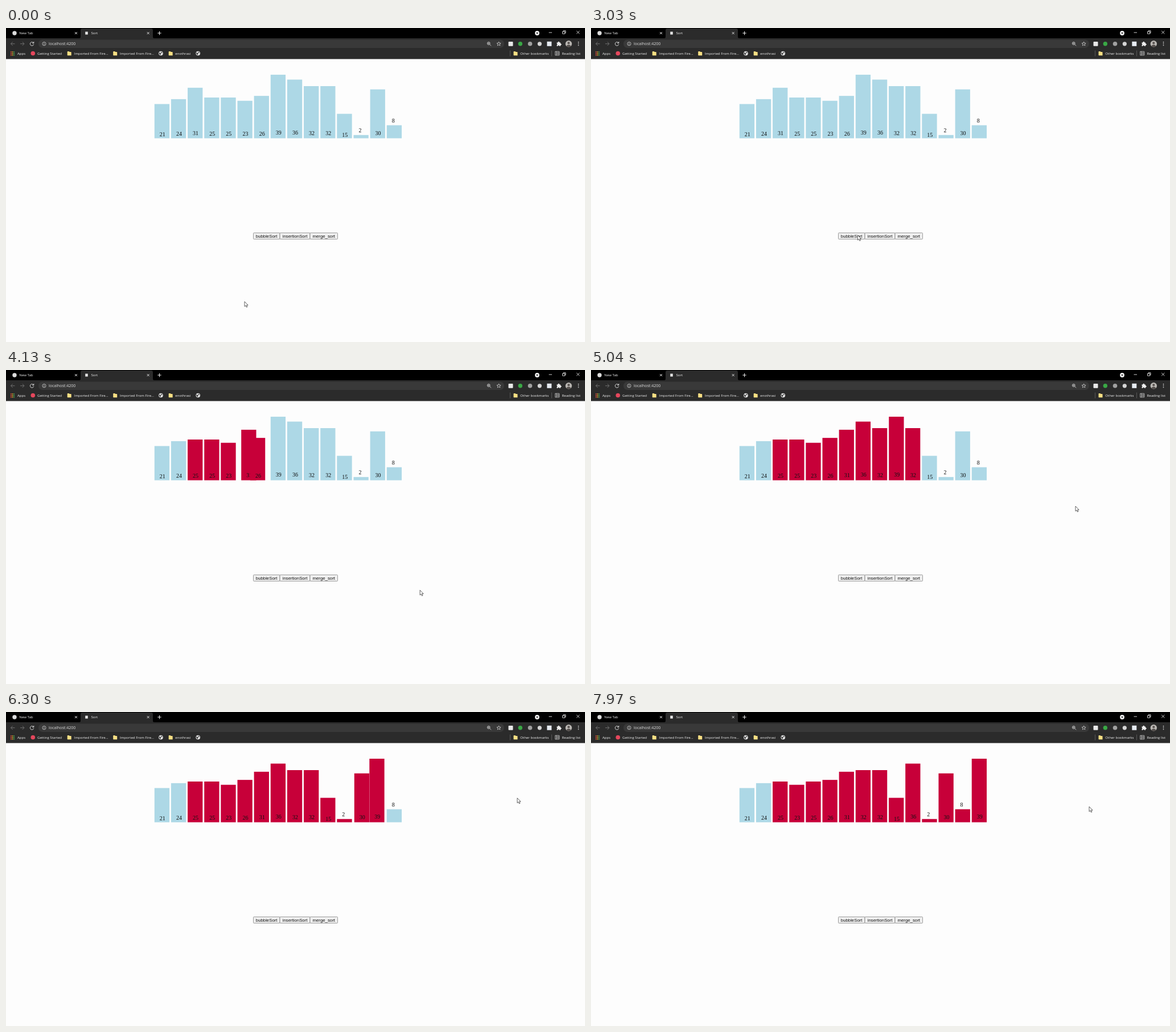
Recreate the animation shown at these times as an HTML page. Size 1017 by 551 pixels, loop 8000 ms.

```html
<!DOCTYPE html>
<html lang="en">
<head>
<meta charset="utf-8">
<title>Sort</title>
<style>
  html, body { margin: 0; width: 100%; height: 100%; overflow: hidden; background: #fdfdfd; }
  svg { display: block; width: 100%; height: 100%; }
  .ui { font: 6.1px "Open Sans", "Noto Sans", sans-serif; fill: #f2f2f2; }
  .btn { font: 7.8px "Liberation Sans", Arial, sans-serif; fill: #111; }
  .num { font: 10px "Liberation Serif", "Times New Roman", serif; fill: #111; }
  .line { fill: none; stroke: #e8e8e8; stroke-width: .9; }
  .dim { stroke: #777; }
</style>
</head>
<body>
<svg id="stage" viewBox="0 0 1017 551" xmlns="http://www.w3.org/2000/svg">
  <rect width="1017" height="551" fill="#fdfdfd"/>

  <!-- tab strip -->
  <rect width="1017" height="18" fill="#000"/>
  <path d="M129 18Q131 18 131 15V4Q131 1 134 1H255Q258 1 258 4V15Q258 18 260 18Z" fill="#2b2b2b"/>
  <circle cx="15" cy="9" r="3.7" fill="#ddd"/>
  <rect x="139.2" y="6.5" width="4.6" height="5" fill="#e4e4e4"/>
  <g class="ui"><text x="23.3" y="11.2">New Tab</text><text x="149.5" y="11.2">Sort</text></g>
  <g class="line">
    <path id="tabClose" d="M121 7l4 4m0-4l-4 4"/>
    <use href="#tabClose" x="126.7"/>
    <path d="M266.3 9h6.4M269.5 5.8v6.4" stroke-width="1.1"/>
    <path d="M953.5 8h5.5M1002.2 5l5.2 5.2m0-5.2l-5.2 5.2M977.6 6.2h4v4h-4zM979 6V4.800h4v4h-1.200"/>
  </g>
  <circle cx="933" cy="9" r="3.9" fill="#f4f4f4"/>
  <path d="M931 8h4l-2 2.500z" fill="#111"/>

  <!-- toolbar -->
  <rect y="18" width="1017" height="36.500" fill="#2b2b2b"/>
  <rect x="57" y="20.500" width="818" height="14.500" rx="7.250" fill="#393939"/>
  <g class="line">
    <path class="dim" d="M15.500 27.700H8.500m3.200-3.200l-3.200 3.200l3.200 3.200M25 27.700h7m-3.200-3.200l3.200 3.200l-3.200 3.200"/>
    <path d="M48.300 26.200A3.200 3.200 0 1 0 48.700 28.500M48.800 24v2.600h-2.600"/>
    <circle cx="67" cy="27.700" r="3.100" stroke-width=".7"/>
    <path d="M67 27.200v2.200M67 25.700v.8" stroke-width=".8"/>
    <circle cx="847.800" cy="27" r="2.400" stroke-width=".8"/>
    <path d="M849.700 28.900l2.400 2.400M846.600 27h2.400M847.800 25.800v2.400" stroke-width=".8"/>
    <path d="M865.600 24.200l1 2.300 2.500.2-1.900 1.700.6 2.400-2.200-1.300-2.200 1.300.6-2.400-1.900-1.700 2.500-.2z" stroke-width=".7"/>
  </g>
  <text class="ui" x="75" y="30.200" style="font-size:7px;fill:#ddd">localhost:4200</text>

  <!-- extensions -->
  <rect x="882.500" y="24" width="8" height="7.800" rx="1" fill="#e8e8e8"/>
  <circle cx="903.300" cy="27.800" r="3.700" fill="#39a845"/>
  <circle cx="920.500" cy="27.800" r="3.800" fill="#a0a0a0"/>
  <circle cx="937.300" cy="27.800" r="3.600" fill="#d5d5d5"/>
  <rect x="950.300" y="23.800" width="8" height="8" fill="#e6ebf2"/>
  <path d="M967.500 25.500h2a1.300 1.300 0 1 1 2.500 0h2v2.100a1.300 1.300 0 1 1 0 2.500v1.700h-2a1.200 1.200 0 0 0-2.500 0h-2v-2.100a1.200 1.200 0 0 0 0-2.300z" fill="#eee"/>
  <circle cx="988.300" cy="27.700" r="5.700" fill="#b9b6b2"/>
  <path d="M984.500 32a4 4 0 0 1 7.600 0a5.700 5.700 0 0 1-7.600 0z" fill="#55504d"/>
  <circle cx="988.300" cy="26.300" r="2" fill="#55504d"/>
  <g fill="#eee"><circle cx="1005.500" cy="24.900" r=".8"/><circle cx="1005.500" cy="27.700" r=".8"/><circle cx="1005.500" cy="30.500" r=".8"/></g>

  <!-- bookmarks -->
  <g id="appGrid"></g>
  <circle cx="47.300" cy="44.500" r="3.800" fill="#e5475c"/>
  <defs>
    <path id="folder" d="M0 .8Q0 0 .8 0H3l1 1h2.200q.8 0 .8.800V7.200H.8Q0 7.200 0 6.400z" fill="#f8df83"/>
    <g id="globe">
      <circle r="3.800" fill="#e6e6e6"/>
      <path d="M-2.700-1.700L-.4-.6.2 1-1 3.100-2.800.9zM.5-3l2.200 1.500L1.600-.1.200-1.200z" fill="#383838"/>
    </g>
  </defs>
  <use href="#folder" x="107.700" y="41"/>
  <use href="#folder" x="188.200" y="41"/>
  <use href="#folder" x="285.700" y="41"/>
  <use href="#folder" x="891.500" y="41"/>
  <use href="#globe" x="272" y="44.500"/>
  <use href="#globe" x="337.300" y="44.500"/>
  <g class="line" stroke-width=".7">
    <path class="dim" d="M885.500 39.500v10M958.500 39.500v10" stroke-width=".6"/>
    <path d="M964.700 41.200h7v6.600h-7zM966.900 41.200v6.600M966.900 43.400h4.800M966.900 45.600h4.800" stroke-width=".7"/>
  </g>
  <g class="ui">
    <text x="20" y="46.700">Apps</text>
    <text x="55" y="46.700">Getting Started</text>
    <text x="119.700" y="46.700">Imported From Fire...</text>
    <text x="200" y="46.700">Imported From Fire...</text>
    <text x="297.300" y="46.700">enothrasi</text>
    <text x="903.300" y="46.700">Other bookmarks</text>
    <text x="976.500" y="46.700">Reading list</text>
  </g>

  <g id="bars"></g>

  <g fill="#efefef" stroke="#767676" stroke-width=".7">
    <rect x="434.500" y="359.500" width="46.500" height="11" rx="1"/>
    <rect x="481" y="359.500" width="53" height="11" rx="1"/>
    <rect x="534" y="359.500" width="48.500" height="11" rx="1"/>
  </g>
  <g class="btn">
    <text x="438.800" y="367.700">bubbleSort</text>
    <text x="485.700" y="367.700">insertionSort</text>
    <text x="538.500" y="367.700">merge_sort</text>
  </g>

  <path id="cursor" d="M0 0V8.700L2 6.900 3.400 10 4.900 9.300 3.500 6.300H6.100Z" fill="#fff" stroke="#222" stroke-width=".7"/>
</svg>
<script>
const LOOP = 8000;
const VALUES = [21, 24, 31, 25, 25, 23, 26, 39, 36, 32, 32, 15, 2, 30, 8];
const LEFT = 260.8, PITCH = 29.14, WIDTH = 26.3, FLOOR = 193.5, UNIT = 2.86;
const SORT_START = 3087, MOVE = 300, SWAP_TIME = 325, SKIP_TIME = 2.3, RED_LEAD = 12;
const BLUE = "#add8e6", RED = "#c70039";

// time, x, y of the pointer tip
const POINTER = [
  [0, 419, 480], [1900, 419, 480], [2600, 447, 385], [2920, 468.5, 363.5],
  [3110, 468.5, 363.5], [3500, 575, 376], [4130, 727, 386.5], [4300, 750, 352],
  [4700, 812, 277], [5000, 851, 239], [5180, 851, 239], [5900, 872, 196],
  [6220, 898, 151], [7080, 898, 150], [7580, 875, 166], [LOOP, 875, 166]
];

const byId = id => document.getElementById(id);
const clamp = v => Math.max(0, Math.min(1, v));

function add(parent, tag, attrs, text) {
  const el = document.createElementNS("http://www.w3.org/2000/svg", tag);
  for (const key in attrs) el.setAttribute(key, attrs[key]);
  if (text !== undefined) el.textContent = text;
  return parent.appendChild(el);
}

const GRID_COLORS = ["#ea4c3f", "#f0b429", "#43a85a", "#4b86ea"];
for (let i = 0; i < 9; i++) {
  const x = 8 + (i % 3) * 2.7, y = 41.3 + Math.floor(i / 3) * 2.7;
  add(byId("appGrid"), "rect", { x, y, width: 1.7, height: 1.7, fill: GRID_COLORS[(i + Math.floor(i / 3)) % 4] });
}

const bars = VALUES.map(value => {
  const group = add(byId("bars"), "g", {});
  const height = value * UNIT;
  const middle = value < 10 ? FLOOR - height - 8 : 190 - value / 6;
  const rect = add(group, "rect", { y: FLOOR - height, width: WIDTH, height });
  add(group, "text", { class: "num", x: 9, y: middle + 3.3 }, value);
  return { group, rect };
});

// Bubble sort run once to schedule every swap of the loop.
function schedule() {
  const order = VALUES.map((_, i) => i), swaps = [];
  let time = SORT_START;
  for (let end = order.length - 1; end > 0; end--) {
    for (let slot = 0; slot < end; slot++) {
      const [a, b] = [order[slot], order[slot + 1]];
      if (VALUES[a] <= VALUES[b]) {
        // the opening comparisons happen before the first swap
        if (swaps.length) time += SKIP_TIME;
        continue;
      }
      swaps.push({ time, slot, a, b });
      order[slot] = b;
      order[slot + 1] = a;
      time += SWAP_TIME;
    }
  }
  return swaps.filter(s => s.time < LOOP + RED_LEAD);
}
const swaps = schedule();

function pointerAt(t) {
  const i = Math.max(1, POINTER.findIndex(p => p[0] > t));
  const [t0, x0, y0] = POINTER[i - 1], [t1, x1, y1] = POINTER[i];
  const k = (t - t0) / (t1 - t0);
  return [x0 + (x1 - x0) * k, y0 + (y1 - y0) * k];
}

function draw(t) {
  const pos = VALUES.map((_, i) => i);
  const red = new Set();
  for (const s of swaps) {
    if (t < s.time - RED_LEAD) break;
    const k = clamp((t - s.time) / MOVE);
    pos[s.a] = s.slot + k;
    pos[s.b] = s.slot + 1 - k;
    red.add(s.a).add(s.b);
  }
  bars.forEach((bar, i) => {
    bar.group.setAttribute("transform", `translate(${LEFT + pos[i] * PITCH} 0)`);
    bar.rect.setAttribute("fill", red.has(i) ? RED : BLUE);
  });
  byId("cursor").setAttribute("transform", `translate(${pointerAt(t).join(" ")})`);
}

const began = performance.now();
function tick() {
  draw((performance.now() - began) % LOOP);
  requestAnimationFrame(tick);
}
tick();
</script>
</body>
</html>
```
